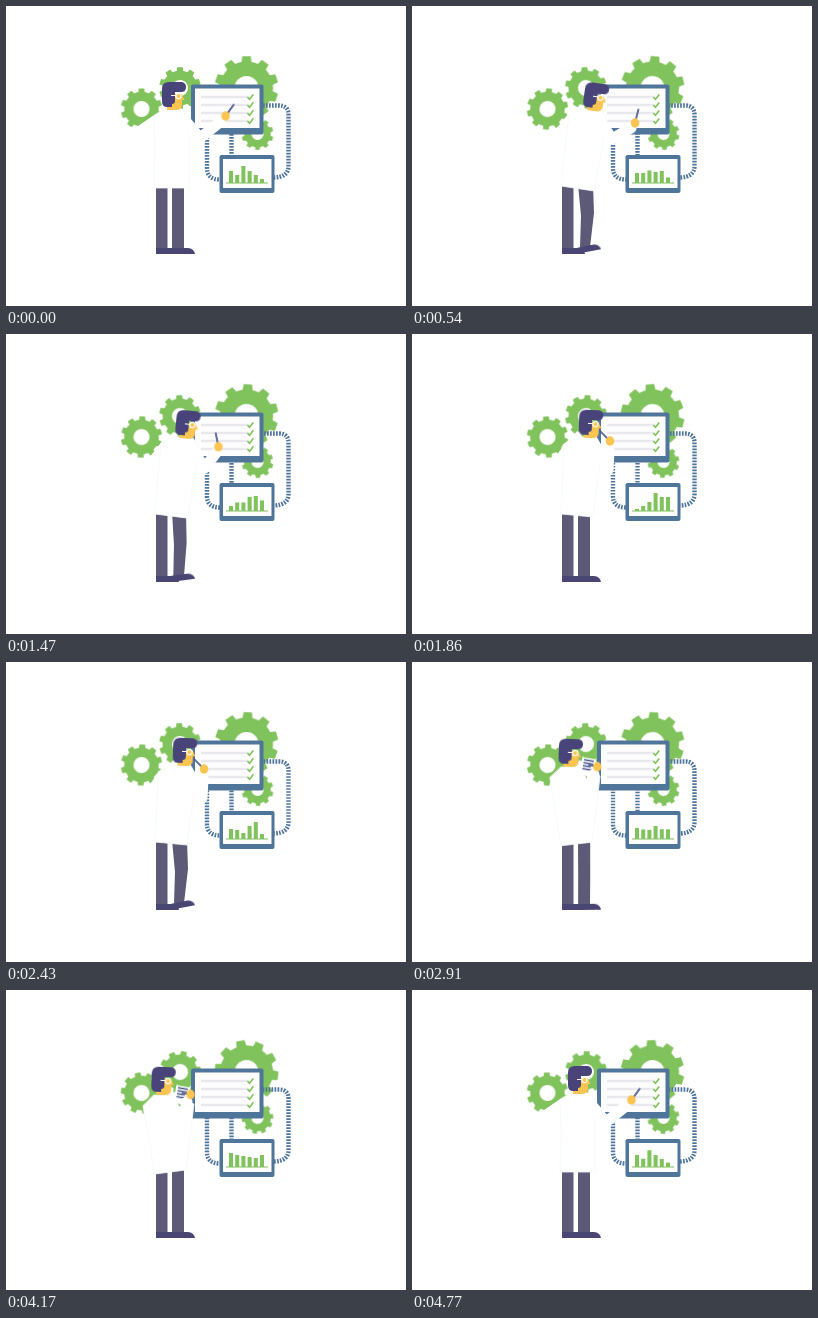
Write an HTML page that moves like this. It is 400 px wide and 300 px high and loops after 4.8 s.

```html
<!DOCTYPE html>
<html lang="en">
<head>
<meta charset="utf-8">
<title>Engineer at the monitor</title>
<style>
  html, body { margin: 0; width: 100%; height: 100%; overflow: hidden; background: #fff; }
  svg { display: block; width: 100vw; height: 100vh; }

  .gear { fill: #80c25c; animation: spin 4.8s linear infinite; }
  .back { animation-direction: reverse; }
  @keyframes spin { to { transform: rotate(360deg); } }

  .cable { fill: none; stroke: #50759a; stroke-width: 4.4; stroke-dasharray: 1.7 1.3; animation: flow 4.8s linear infinite; }
  @keyframes flow { to { stroke-dashoffset: -72px; } }

  .bezel { fill: #50759a; }
  .glass { fill: #fdfdfe; }
  .rows { stroke: #e9e9ed; stroke-width: 2.6; }
  .ticks { fill: none; stroke: #80c25c; stroke-width: 1.7; }
  .bar { fill: #80c25c; transform-box: fill-box; transform-origin: 50% 100%; }

  .leg { fill: #5d5a78; }
  .shoe { fill: #4a4673; }
  .coat, .sleeve { stroke-linejoin: round; stroke-linecap: round; }
  .coat { fill: #fff; stroke: #f4faf9; stroke-width: .8; }
  .sleeve { fill: none; stroke: #fff; stroke-width: 11; }
  .hair { fill: #48447a; }
  .skin { fill: #fcc551; }
  .pen { stroke: #48588a; stroke-width: 1.7; stroke-linecap: round; }

  .pose { animation: 4.8s ease-in-out infinite; }
  #coat { animation-name: coat; }
  #rest { animation-name: rest; }
  #arm { animation-name: arm; }
  #head { animation-name: head; transform-origin: 168px 104px; }
  #hand { animation-name: hand; }
  #pen { animation-name: pen; }
  #pad { animation-name: pad; }
  #leg { animation-name: leg; }
  #shoe { animation-name: shoe; transform-origin: 169px 246px; }

  @keyframes coat {
    0%, 99%, 100% { d: path("M158 103L176 103L183 112L183 182L148 182L149 140L148 110Z"); }
    10%, 27% { d: path("M172 103L189 104L195 114L182 185L149 180L153 140L157 110Z"); }
    35%, 54% { d: path("M168 103L185 104L190 113L181 183L149 180L151 140L152 110Z"); }
    62%, 89% { d: path("M148 105L166 106L188 114L180 180L149 184L141 140L137 116Z"); }
  }
  @keyframes rest {
    0%, 99%, 100% { d: path("M152 113L130 128L148 148"); }
    10%, 27% { d: path("M160 112L143 133L153 155"); }
    35%, 54% { d: path("M158 112L143 133L153 155"); }
    62%, 89% { d: path("M148 118L148 140L152 150"); }
  }
  @keyframes arm {
    0%, 99%, 100% { d: path("M177 112L194 132L214 116"); }
    10%, 27% { d: path("M186 112L200 133L219 122"); }
    35%, 54% { d: path("M184 113L196 136L197 116"); }
    62%, 89% { d: path("M168 118L176 135L181 112"); }
  }
  @keyframes head {
    0%, 99%, 100% { transform: none; }
    10%, 27% { transform: translate(14px, 1px) rotate(8deg); }
    35%, 54% { transform: translate(10.5px, 0) rotate(2deg); }
    62%, 89% { transform: translate(-11px, 1px) rotate(2deg); }
  }
  @keyframes hand {
    0%, 99%, 100% { transform: translate(219.5px, 110px); }
    10%, 27% { transform: translate(223px, 117px); }
    35%, 54% { transform: translate(198px, 107px); }
    62%, 89% { transform: translate(184.5px, 104.5px); }
  }
  @keyframes pen {
    0%, 99%, 100% { transform: rotate(36deg); }
    10%, 27% { transform: rotate(14deg); }
    35%, 54% { transform: rotate(-45deg); }
    62%, 89% { transform: rotate(-80deg) scaleY(.6); }
  }
  @keyframes pad {
    0%, 56%, 95%, 100% { opacity: 0; }
    60%, 90% { opacity: 1; }
  }
  @keyframes leg {
    0%, 36%, 42%, 62%, 100% { d: path("M166 178L178 178L178 212L178 244L166 244L166 212Z"); }
    10%, 27%, 50%, 54% { d: path("M166 178L181 178L182 207L178 241L168 241L169 210Z"); }
  }
  @keyframes shoe {
    0%, 36%, 42%, 62%, 100% { transform: none; }
    10%, 27%, 50%, 54% { transform: translateY(-1px) rotate(-11deg); }
  }
</style>
</head>
<body>
<svg viewBox="0 0 400 300">
  <g id="gears"></g>

  <path class="cable" d="M257 99.5H273Q282.500 99.500 282.500 109V160Q282.500 171 268 171.500"/>
  <path class="cable" d="M201 128V162Q201 173.500 214 173.500"/>
  <path class="cable" d="M225.500 128V150"/>

  <rect class="bezel" x="185" y="78.500" width="72.500" height="50" rx="2"/>
  <rect class="glass" x="189" y="82.500" width="64.500" height="39.500"/>
  <path class="rows" d="M195 91H242M195 99H242M195 107H242M195 115H242"/>
  <path class="ticks" d="M241.500 91l2 2.200 3.800-4.700m-5.800 10.500l2 2.200 3.800-4.700m-5.800 10.500l2 2.200 3.800-4.700m-5.800 10.500l2 2.200 3.800-4.700"/>

  <rect class="bezel" x="213.500" y="149" width="55" height="38" rx="2"/>
  <rect class="glass" x="217" y="153" width="48.500" height="29"/>
  <g id="bars"></g>
  <path stroke="#80c25c" stroke-width="1.2" d="M220 177H262"/>

  <path class="leg" d="M150 178H161.500V244H150Z"/>
  <path class="shoe" d="M150 242H166Q172 242 173 248H150Z"/>
  <path class="leg pose" id="leg" d="M166 178L178 178L178 212L178 244L166 244L166 212Z"/>
  <path class="shoe pose" id="shoe" d="M166 242H182Q188 242.500 189 248H166Z"/>

  <path class="sleeve pose" id="rest" d="M152 113L130 128L148 148"/>
  <path class="coat pose" id="coat" d="M158 103L176 103L183 112L183 182L148 182L149 140L148 110Z"/>
  <g class="pose" id="pad">
    <g transform="rotate(10 176 104)">
      <rect x="169" y="95" width="14" height="17" fill="#fff"/>
      <path d="M169.500 95.500H182.500" stroke="#80c25c" stroke-width="1.400"/>
      <path d="M171 98.500H181M171 101.500H181M171 104.500H179M171 107.500H181" stroke="#48588a" stroke-width="1.700"/>
      <path d="M173 115.500H177" stroke="#80c25c" stroke-width="2"/>
    </g>
  </g>
  <path class="sleeve pose" id="arm" d="M177 112L194 132L214 116"/>

  <g class="pose" id="head">
    <path class="skin" d="M161 88H176V98Q176 104 170 104H161Z"/>
    <path class="hair" d="M156 83Q156 76 163 76H176Q180 77 180 81Q180 86 175 86H169V95Q169 98 166 98V101H161Q156 101 156 95Z"/>
    <circle cx="172.500" cy="90" r="2.600" fill="none" stroke="#fff" stroke-width="1.100"/>
    <path d="M165 89.500H170" stroke="#fff"/>
    <path class="skin" d="M176 89L178.500 94H176Z"/>
  </g>

  <g class="pose" id="hand">
    <path class="pen pose" id="pen" d="M0 0V-14"/>
    <ellipse class="skin" rx="4.300" ry="4.700"/>
  </g>
</svg>

<script>
  const add = (parent, name, attrs) => {
    const node = document.createElementNS("http://www.w3.org/2000/svg", name);
    for (const key in attrs) node.setAttribute(key, attrs[key]);
    return parent.appendChild(node);
  };

  // Ring with tapered teeth; the hub is cut out by the even-odd rule.
  function gearPath(r, hole, teeth = 10) {
    const pitch = 2 * Math.PI / teeth, root = r * 0.83, pts = [];
    for (let i = 0; i < teeth; i++) {
      for (const [k, rad] of [[-0.3, root], [-0.21, r], [0.21, r], [0.3, root], [0.5, root]]) {
        const a = (i + k) * pitch;
        pts.push((rad * Math.sin(a)).toFixed(2) + " " + (-rad * Math.cos(a)).toFixed(2));
      }
    }
    return `M${pts.join("L")}ZM${hole} 0A${hole} ${hole} 0 1 0 ${-hole} 0A${hole} ${hole} 0 1 0 ${hole} 0Z`;
  }

  const gears = document.getElementById("gears");
  for (const [x, y, r, hole, turn] of [
    [240.5, 82, 32, 12, ""], [174, 82, 21, 8, "back"],
    [135.5, 103, 20.8, 8, ""], [251.5, 128, 16, 6, "back"]
  ]) {
    const spot = add(gears, "g", { transform: `translate(${x} ${y})` });
    add(spot, "path", { d: gearPath(r, hole), class: "gear " + turn, "fill-rule": "evenodd" });
  }

  // Bar heights at each data change.
  const times = [0, 0.225, 0.3875, 0.506, 0.7, 0.869, 1];
  const levels = [
    [12, 8, 17, 12, 8, 4], [8, 12, 8, 10, 16, 7], [2, 5, 9, 18, 14, 14],
    [10, 9, 6, 13, 17, 5], [12, 10, 12, 13, 3, 14], [14, 12, 11, 10, 9, 12]
  ];
  const bars = document.getElementById("bars");
  for (let i = 0; i < 6; i++) {
    const bar = add(bars, "rect", { x: 223 + i * 6.2, y: 157, width: 4, height: 20, class: "bar" });
    bar.animate(
      times.map((offset, n) => ({ offset, transform: `scaleY(${levels[n % 6][i] / 20})` })),
      { duration: 4800, iterations: Infinity }
    );
  }
</script>
</body>
</html>
```
